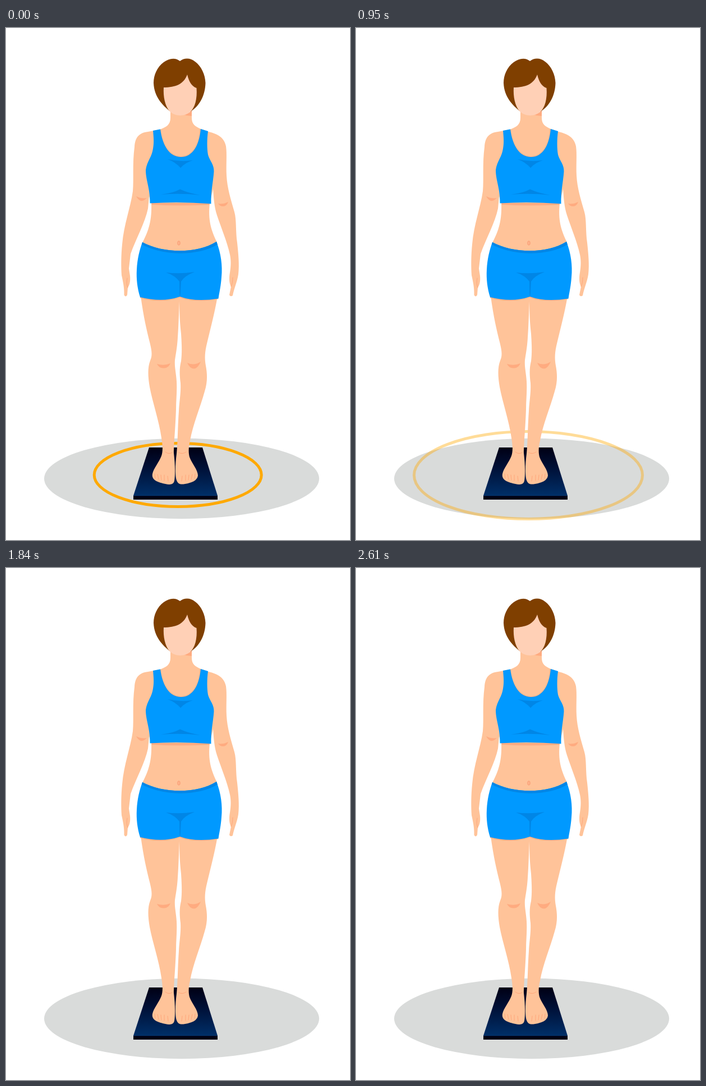
Recreate the animation shown at these times as an HTML page. Size 613 by 913 pixels, loop 3.28 s.

```html
<!DOCTYPE html>
<html lang="en">
<head>
<meta charset="utf-8">
<title>Body scan</title>
<style>
  html, body { margin: 0; width: 100%; height: 100%; overflow: hidden; background: #fff; }
  svg { display: block; width: 613px; height: 913px; }

  .ring {
    fill: none; stroke: #ffa900; stroke-width: 5; opacity: 0;
    animation: pulse 3280ms infinite;
    animation-timing-function: steps(10, start);
  }
  .r1 { animation-name: leave; }
  .r2 { animation-delay: 500ms; }
  .r3 { animation-delay: 1270ms; }
  .r4 { animation-delay: 2040ms; }
  @keyframes leave {
    0%, .914% { opacity: 1; }
    10.06%, 100% { opacity: 0; }
  }
  @keyframes pulse {
    0% { opacity: 0; }
    9.146% { opacity: 1; }
    18.292%, 100% { opacity: 0; }
  }

  .skin { fill: #ffc399; }
  .crease { fill: #ffab80; }
  .line { fill: none; stroke: #ffa67a; stroke-width: 1; stroke-linecap: round; }
  .cloth { fill: #0099ff; }
  .fold { fill: #0086e6; }
  .hair { fill: #7f3f00; }
  .face { fill: #ffd0b6; }
</style>
</head>
<body>
<svg viewBox="0 0 613 913">
  <defs>
    <linearGradient id="glass" x1="0" y1="0" x2="0" y2="1">
      <stop offset="0" stop-color="#000014"/>
      <stop offset=".4" stop-color="#000f35"/>
      <stop offset="1" stop-color="#002f68"/>
    </linearGradient>
  </defs>

  <ellipse cx="313" cy="803.5" rx="245" ry="71.7" fill="#d9dbda"/>

  <ellipse class="ring r1" cx="306.2" cy="797" rx="149" ry="56.5"/>
  <ellipse class="ring r2" cx="307" cy="797.5" rx="203.5" ry="78"/>
  <ellipse class="ring r3" cx="307" cy="798" rx="251.5" ry="96.5"/>
  <ellipse class="ring r4" cx="306.5" cy="798" rx="303" ry="115.5"/>

  <!-- scale -->
  <path fill="url(#glass)" d="M255 748H350L377 834H227Z"/>
  <path fill="#000014" d="M227 834H377V841H227Z"/>
  <path fill="none" stroke="#0a3a70" stroke-width=".7" d="M227 834H377"/>

  <!-- legs -->
  <path class="skin" d="M240 478C245 515 251 540 256 560C260 576 261 584 257 593C252 606 253 622 256 640C261 667 273 701 277 731C279 743 280 754 277 763C273 774 263 785 261 795C259 806 270 810 284 813C293 815 299 814 300 807C302 795 301 774 299 758C299 742 302 711 303 680C303 664 305 648 304 630C303 614 300 604 301 592C303 578 305 570 306 552C308 524 308 502 309.500 478Z"/>
  <path class="skin" d="M377 478C372 508 364 537 357 567C354 581 354 591 356 602C359 618 359 632 354 648C346 677 333 707 328 736C325 748 325 757 327 765C331 776 342 788 342 798C341 807 331 811 319 813C309 815 305 812 303 803C301 792 302 775 304 759C306 740 306 711 308 683C309 664 312 650 311 633C309 617 309 606 312 594C314 578 313 561 312 545C309 518 309 500 309 478Z"/>
  <path class="crease" d="M269 599Q281 603 293 598Q289 607 281 606.500Q273 607 269 599Z"/>
  <path class="crease" d="M323 597Q335 603 347 595Q342 607 335 607.500Q327 607 323 597Z"/>
  <path class="line" d="M284 756Q290 761 296 757M308 757Q314 761 321 756"/>
  <path class="line" d="M265 795L266 803M270 796L272 805M276 797L277 806M282 797V807M288 799L289 808M337 795L336 803M332 796L330 805M326 797L325 806M320 797V807M314 799L313 808"/>

  <!-- arms, neck and torso -->
  <path class="skin" d="M293 145V160C293 173 285 177 274 181L253 185C236 187 230 196 229 212C225 242 228 270 226 291C222 320 210 350 207 386C205 406 205 425 206 441C209 454 211 465 210.500 476Q213 481 216 476L217 463C220 459 222 452 221 442L219 429C220 420 221 411 222 403C231 377 248 347 253 322L255 300L259 313C260 342 255 360 243 383L245 405L309 420L373 405L376 382C365 360 360 342 363 313L369 287C370 302 371 319 376 334C384 358 394 381 399 404C401 414 401 423 399 436C397 447 398 456 401 461L398 476Q400 480 404 477C406 465 412 453 414 439C416 422 414 402 412 383C409 364 411 342 407 328C401 307 394 285 393 263C392 244 394 225 392 211C389 195 377 189 361 185L347 180C337 175 331 172 331 160V145Z"/>
  <path class="crease" d="M232 300Q241 305 251 303Q246 309 240 308Q235 306 232 300Z"/>
  <path class="crease" d="M378 313Q387 315 396 310Q393 318 387 318Q381 318 378 313Z"/>
  <path class="line" d="M217 463Q214 456 216 446M401 461Q404 455 404 445"/>
  <ellipse cx="308" cy="383.500" rx="2.200" ry="3.700" fill="#ffb48c" stroke="#f99a70"/>
  <path class="crease" d="M259 312H363L362 315Q310 318 260 315Z"/>

  <!-- top -->
  <path fill="none" stroke="#ffab80" stroke-width="2" d="M274.500 181C278 210 291 230 312 230C331 230 345 212 347 180"/>
  <path class="cloth" d="M262 183L275 180.500C279 211 292 230 312 230C331 230 344 212 347 180L360 184C358 199 358 215 360 226C363 237 371 243 370.500 256C369 276 365 291 365.500 313.500Q310 309 256.500 312.500C257 286 249 272 249 253C251 238 260 230 262 215C264 204 263 195 262 183Z"/>
  <path class="fold" d="M288 234Q310 239 333 236Q319 240 311 249.500Q302 239 288 234Z"/>
  <path class="fold" d="M276 297Q299 294 310 287.500Q324 294 346 298Q311 294 276 297Z"/>

  <!-- shorts -->
  <path fill="none" stroke="#ffab80" stroke-width="2" d="M239 480Q276 491 309 479Q338 490 378 482"/>
  <path class="cloth" d="M243 382C280 402 340 403 375 381C383 401 386 424 384 444C383 460 380 472 378.500 482.500Q337 489 310 479Q279 490 239 480C234 465 232 447 233 431C234 411 238 396 243 382Z"/>
  <path class="fold" d="M243 382C280 402 340 403 375 381L377 386C340 408 279 406 242 386Z"/>
  <path class="fold" d="M285 436Q310 439 336 435Q318 442 312 452L310.500 479H309.500L309 452Q301 441 285 436Z"/>

  <!-- head -->
  <path class="crease" d="M331 145V157Q323 157 315 154Z"/>
  <path class="hair" d="M310 59C302 52 290 54 281 61C269 70 263 84 263 98C264 123 279 138 293 149H329C345 139 355 120 355.500 98C355 83 348 68 337 60C328 53 318 53 310 59Z"/>
  <path class="face" d="M281 106C302 106 317 100 323 83C326 96 331 104 339.500 107C341 126 337 142 328 150C318 158 302 158 292 149C283 139 280 122 281 106Z"/>
</svg>
</body>
</html>
```
